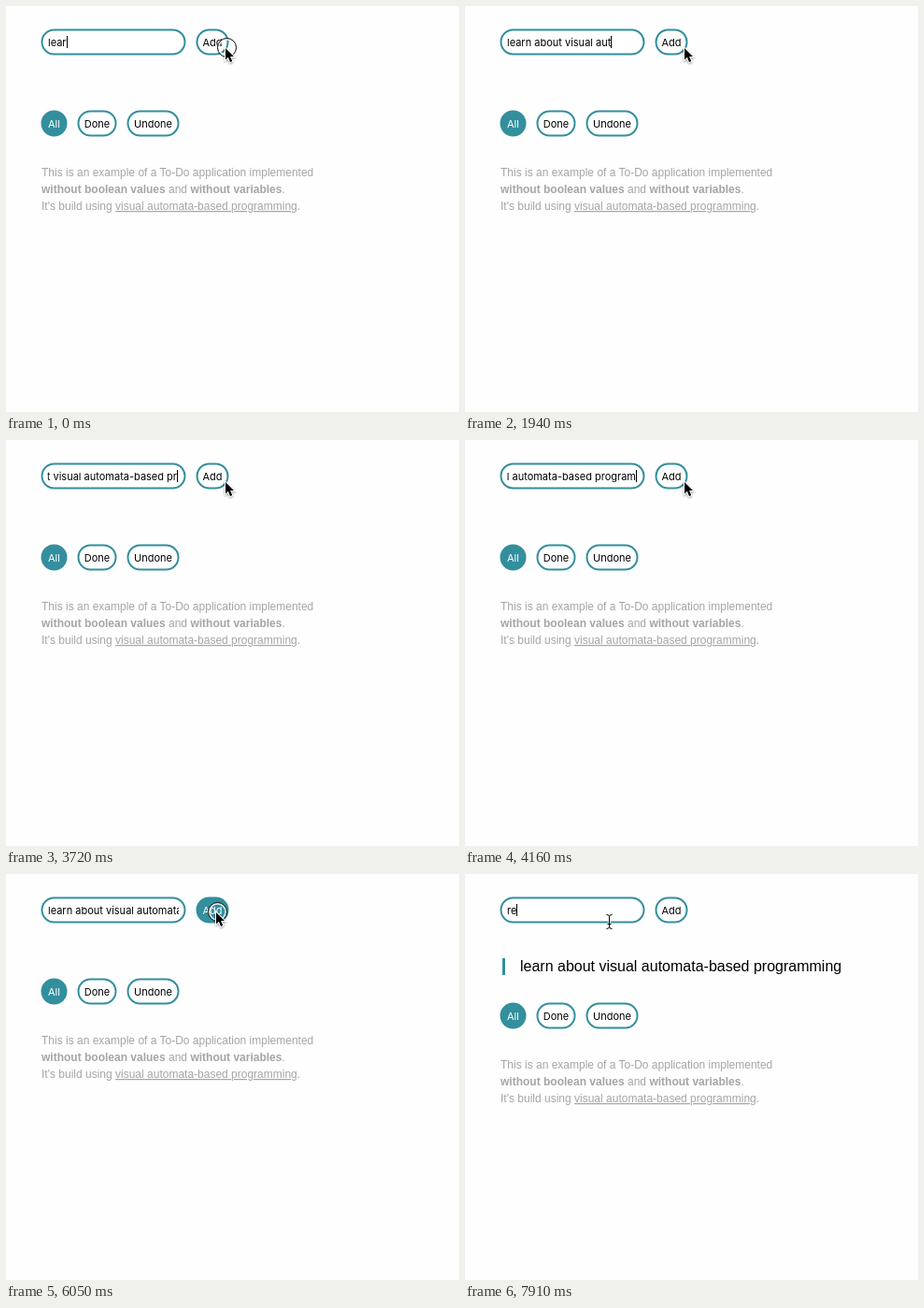
An HTML page that plays this animation: 485x434 px, repeating every 8 s.

```html
<!DOCTYPE html>
<html lang="en">
<head>
<meta charset="utf-8">
<title>To-Do</title>
<style>
  html, body { margin: 0; width: 100%; height: 100%; overflow: hidden; background: #fefefe; }
  svg { display: block; }
  text { white-space: pre; }
  .ui { font: 11px Inter, sans-serif; }
  .mid { text-anchor: middle; }
  .pill { fill: #fff; stroke: #338f9d; stroke-width: 2; }
  .on .pill { fill: #338f9d; }
  .on text { fill: #fff; }
  .note { font: 12px "Liberation Sans", Arial, sans-serif; fill: #a5a5a5; }
  .note .b { font-weight: bold; }
  .note .u { text-decoration: underline; }
  .item { font: 16px "Liberation Sans", Arial, sans-serif; }
  #arrow { stroke: #fff; stroke-width: 2; paint-order: stroke; filter: drop-shadow(0 1px 1px #0006); }
  #beam, #ring { fill: none; stroke: #000; }
  #beam .halo, #ring .halo { stroke: #fff; stroke-opacity: .8; stroke-width: 2.4; }
</style>
</head>
<body>
<svg width="485" height="434" viewBox="0 0 485 434">
  <defs>
    <clipPath id="field"><rect x="44.5" y="28" width="140.5" height="21"/></clipPath>
    <path id="ibeam" d="M-3-7.5Q0-7.5 0-5.5Q0-7.5 3-7.5M0-5.5V5.5M-3 7.5Q0 7.5 0 5.5Q0 7.5 3 7.5M-2 2.5H2"/>
  </defs>

  <rect class="pill" x="38.5" y="25.5" width="153" height="26" rx="13"/>
  <g clip-path="url(#field)">
    <text id="typed" class="ui" y="43"></text>
  </g>
  <rect id="caret" y="32" width="1" height="13"/>

  <g id="add" class="ui">
    <rect class="pill" x="204.5" y="25.5" width="33" height="26" rx="13"/>
    <text class="mid" x="221" y="43">Add</text>
  </g>

  <g id="item">
    <rect x="40" y="90" width="3" height="18" fill="#338f9d"/>
    <text class="item" x="59" y="104">learn about visual automata-based programming</text>
  </g>

  <g id="lower">
    <g class="ui on">
      <rect class="pill" x="38.5" y="112.5" width="26" height="26" rx="13"/>
      <text class="mid" x="51.5" y="130">All</text>
    </g>
    <g class="ui">
      <rect class="pill" x="77.5" y="112.5" width="40" height="26" rx="13"/>
      <text class="mid" x="97.5" y="130">Done</text>
      <rect class="pill" x="130.5" y="112.5" width="54" height="26" rx="13"/>
      <text class="mid" x="157.5" y="130">Undone</text>
    </g>
    <g class="note">
      <text x="38" y="182">This is an example of a To-Do application implemented</text>
      <text x="38" y="200"><tspan class="b">without boolean values</tspan> and <tspan class="b">without variables</tspan>.</text>
      <text x="38" y="218">It's build using <tspan class="u">visual automata-based programming</tspan>.</text>
    </g>
  </g>

  <g id="ring">
    <circle class="halo" r="9"/>
    <circle r="10"/>
  </g>
  <path id="arrow" d="M.5 1V13.5L3.4 10.8 5.5 15.9 7.7 15 5.6 10H9.5Z"/>
  <g id="beam">
    <use class="halo" href="#ibeam"/>
    <use href="#ibeam"/>
  </g>
</svg>
<script>
const LOOP = 8000;
const TASK = 'learn about visual automata-based programming';
const NEXT = 're';
const LEFT = 45, RIGHT = 183, BLINK = 500, KEY = 90;

// Moments of the story, in ms
const TYPED = 4700, PRESS = 6050, ADDED = 6230, LEAVE = 6590, FOCUS = 7120, RETYPE = 7820;

// Typing pace: characters present at a few moments
const pace = [
  [0, 4], [180, 7], [260, 7], [1050, 16], [1410, 18], [1940, 22],
  [2300, 23], [3100, 31], [3460, 33], [4160, 41], [TYPED, 45]
];

// Pointer glides: from the start, to the button, into the field, slightly down
const glide = [
  [5060, 234.5, 44], [5330, 224.5, 40],
  [6500, 224.5, 40], [6850, 141.5, 43],
  [7470, 141.5, 43], [7640, 154.5, 51]
];

const $ = id => document.getElementById(id);
const show = (id, on) => $(id).setAttribute('visibility', on ? 'visible' : 'hidden');
const move = (id, x, y) => $(id).setAttribute('transform', `translate(${x} ${y})`);
const within = (t, from, length) => t >= from && t < from + length;

// Linear interpolation through [time, ...values] points
function at(points, t) {
  const next = points.findIndex(p => p[0] > t);
  if (next < 1) return points.at(next).slice(1);
  const [a, b] = [points[next - 1], points[next]];
  const k = (t - a[0]) / (b[0] - a[0]);
  return a.slice(1).map((v, i) => v + (b[i + 1] - v) * k);
}

function typedText(t) {
  if (t < ADDED) return TASK.slice(0, Math.floor(at(pace, t)[0] + .2));
  return NEXT.slice(0, Math.max(0, Math.floor((t - RETYPE) / KEY) + 1));
}

// The caret blinks from the latest key press or focus
function caretLit(t) {
  const since = [RETYPE, FOCUS, TYPED, 0].find(start => t >= start);
  return t < TYPED || Math.floor((t - since) / BLINK) % 2 === 0;
}

function draw(t) {
  const typed = $('typed');
  typed.textContent = typedText(t);
  const width = typed.textContent ? typed.getComputedTextLength() : 0;
  const focused = t < PRESS || t >= FOCUS;
  const x = focused ? Math.min(LEFT, RIGHT - width) : LEFT;
  typed.setAttribute('x', x);
  $('caret').setAttribute('x', Math.round(x + width));
  show('caret', focused && caretLit(t));

  const added = t >= ADDED;
  show('item', added);
  move('lower', 0, added ? 26 : 0);
  $('add').classList.toggle('on', t >= PRESS && t < LEAVE);

  const [px, py] = at(glide, t);
  const overField = px < 193;
  show('arrow', !overField);
  show('beam', overField);
  move('arrow', px, py);
  move('beam', px, py);
  move('ring', px + (overField ? 1 : 2), py + (overField ? -1.5 : .5));
  show('ring', within(t, 0, 90) || within(t, PRESS, 180) || within(t, FOCUS, 80));
}

const begin = performance.now();
function frame() {
  draw((performance.now() - begin) % LOOP);
  requestAnimationFrame(frame);
}
frame();
</script>
</body>
</html>
```
